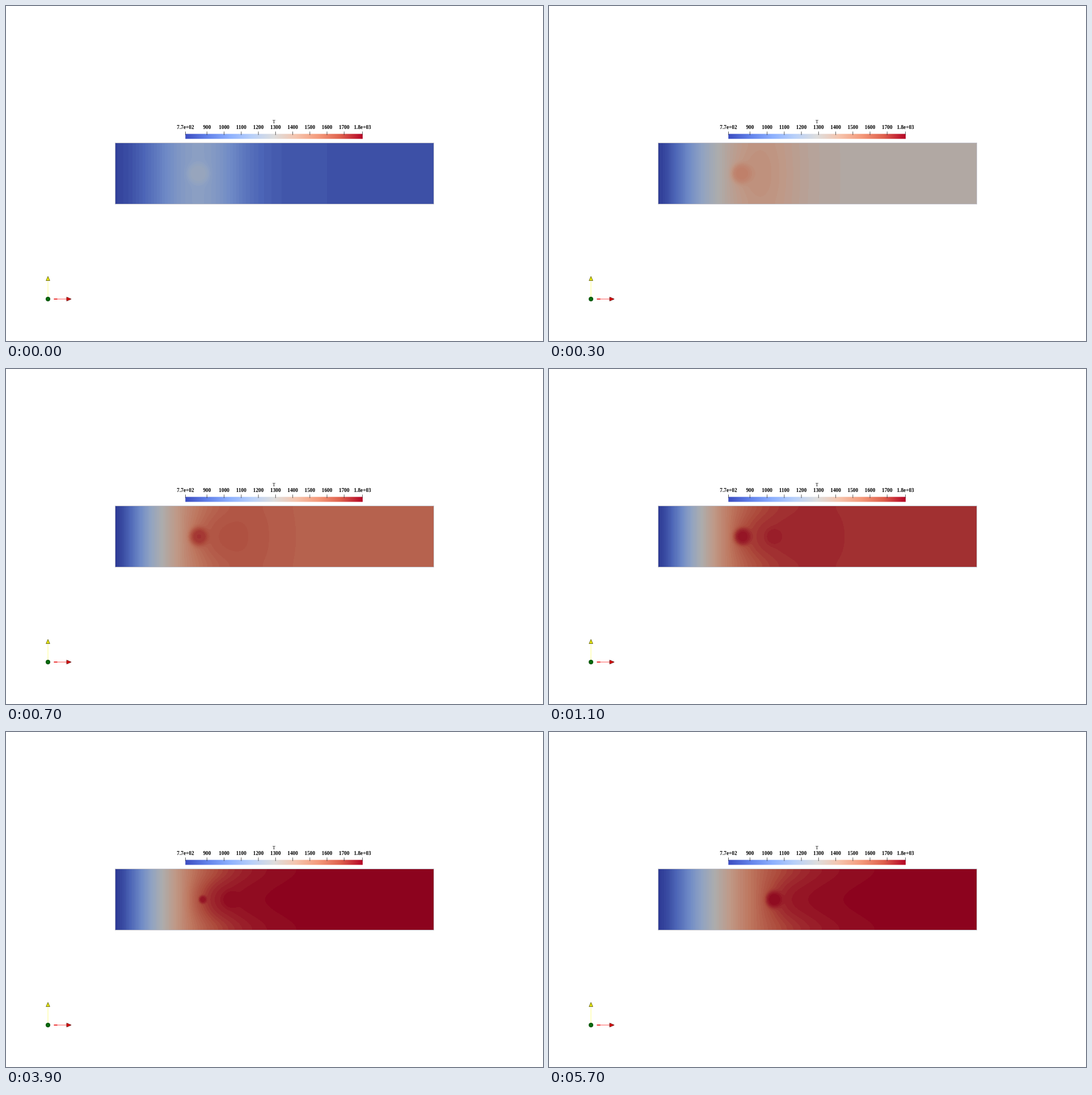
These frames come from a looping animation (947x591 px, 6 s). An HTML page with a canvas:

```html
<!DOCTYPE html>
<html lang="en">
<head>
<meta charset="utf-8">
<title>Temperature field</title>
<style>
  html, body { margin: 0; width: 100%; height: 100%; overflow: hidden; background: #fff; }
  canvas { position: absolute; left: 193px; top: 242px; box-shadow: 0 0 0 1px #c4c4cc; }
  svg { position: absolute; left: 0; top: 0; }
  text { font: bold 9.3px "Liberation Serif", serif; text-anchor: middle; }
</style>
</head>
<body>
<canvas id="field" width="561" height="107"></canvas>
<svg width="947" height="591" viewBox="0 0 947 591">
  <defs><linearGradient id="scale"></linearGradient></defs>
  <rect x="316.3" y="225.6" width="312.7" height="8.8" fill="url(#scale)"/>
  <text x="472.5" y="207" style="font-weight: normal; font-size: 8.5px">T</text>
  <g id="ticks"></g>
  <g transform="translate(.5 .5)">
    <path d="M73.5 486V513" stroke="#ffff8c"/>
    <path d="M73.5 476.5L76.8 484H70.2Z" fill="#e6e600" stroke="#55550a" stroke-width=".8"/>
    <path d="M84 516.5H107" stroke="#ff5050"/>
    <path d="M84 516.5H90" stroke="#e61e1e" stroke-width="1.6"/>
    <path d="M106.5 513.1L114.5 516.5L106.5 519.9Z" fill="#e01010" stroke="#5a0808" stroke-width=".8"/>
    <circle cx="73.5" cy="516.5" r="3.7" fill="#066a0c" stroke="#064006" stroke-width=".8"/>
  </g>
</svg>
<script>
const LOOP = 6000, LEVELS = 64, SHADE = 0.78;
const LEFT = 193, WIDTH = 561, HEIGHT = 107;

// The picture is refreshed every 100 ms at first, then only at these moments.
const LATE_STEPS = [900, 1100, 2300, 2900, 3300, 3600, 3900, 4200, 4400];

// Diverging blue-grey-red scale, evenly spaced stops.
const STOPS = ['3b4cc0', '6282ea', '8db0fe', 'b8d0f9', 'dddddd', 'f5c4ad', 'f49a7b', 'de604d', 'b40426'];
const RGB = STOPS.map(hex => [0, 2, 4].map(i => parseInt(hex.slice(i, i + 2), 16)));

const clamp = (v, lo = 0, hi = 1) => Math.min(Math.max(v, lo), hi);
const mix = (a, b, p) => a + (b - a) * p;
const smooth = p => (p = clamp(p), p * p * (3 - 2 * p));

function shadedColour(u) {
  const s = u * (RGB.length - 1);
  const i = Math.min(Math.floor(s), RGB.length - 2);
  return RGB[i].map((c, k) => SHADE * mix(c, RGB[i + 1][k], s - i));
}
const palette = Array.from({ length: LEVELS + 1 }, (_, i) => shadedColour(i / LEVELS));

// Normalised temperature at time t (seconds) as a function of x and the offset from the centre line.
function temperatureField(t) {
  const blownOff = smooth((t - 4.1) / .3);
  const plateau = 1 - .93 * Math.exp(-t / .435);
  const rampLength = 96 - 24 * Math.exp(-t / .7) + 4 * clamp(t - 1.1, 0, 3.3) + 19 * blownOff;

  // Ignition heat, which fades while it drifts downstream.
  const ignition = .29 * Math.exp(-t / .4), ignitionX = 337 + 70 * t;

  // Two flame holders: the first shrinks until the flame jumps to the second.
  const anchor = mix(345, 397, blownOff);
  const holders = [
    { x: 339 + 2.1 * t, r: 19 - 3 * t, heat: Math.min(.97, plateau + ignition + .05), on: 1 - blownOff },
    { x: 397, r: 15, heat: Math.min(.99, plateau + .03), on: 1 }
  ].filter(holder => holder.on > 0);

  return (x, dy) => {
    const wake = 55 * Math.cos(Math.PI * dy / HEIGHT) ** 2 * smooth((x - anchor + 40) / 80);
    let u = plateau * (1 - Math.exp(-(((x - LEFT + wake) / rampLength) ** 1.45)));
    u += ignition * Math.exp(-(((x - ignitionX) / 62) ** 2) / 2);
    for (const { x: cx, r, heat, on } of holders) {
      const q = ((x - cx) ** 2 + dy * dy) / (r * r);
      u += on * Math.max(0, heat - u) * Math.exp(-q * q);
    }
    return clamp(u);
  };
}

const ctx = document.getElementById('field').getContext('2d');
const image = ctx.createImageData(WIDTH, HEIGHT);
image.data.fill(255);

function draw(time) {
  const temperature = temperatureField(time / 1000);
  for (let row = 0, i = 0; row < HEIGHT; row++) {
    for (let col = 0; col < WIDTH; col++, i += 4) {
      const u = temperature(LEFT + col + .5, row + .5 - HEIGHT / 2);
      image.data.set(palette[Math.round(u * LEVELS)], i);
    }
  }
  ctx.putImageData(image, 0, 0);
}

function buildScale() {
  document.getElementById('scale').innerHTML = STOPS.map((hex, i) =>
    `<stop offset="${i / (STOPS.length - 1)}" stop-color="#${hex}"/>`).join('');
  const tick = (x, label) =>
    `<path d="M${x} 221.5V227.5" stroke="#333" stroke-width=".8"/><text x="${x}" y="217">${label}</text>`;
  let marks = tick(316.5, '7.7e+02') + tick(628.6, '1.8e+03');
  for (let v = 900; v <= 1700; v += 100) marks += tick(354.4 + (v - 900) * .3024, v);
  document.getElementById('ticks').innerHTML = marks;
}

let shown = -1;
function frame(now) {
  const time = now % LOOP;
  const early = Math.min(700, Math.floor(time / 100) * 100);
  const step = LATE_STEPS.findLast(s => s <= time) ?? early;
  if (step !== shown) draw(shown = step);
  requestAnimationFrame(frame);
}

buildScale();
draw(0);
requestAnimationFrame(frame);
</script>
</body>
</html>
```
